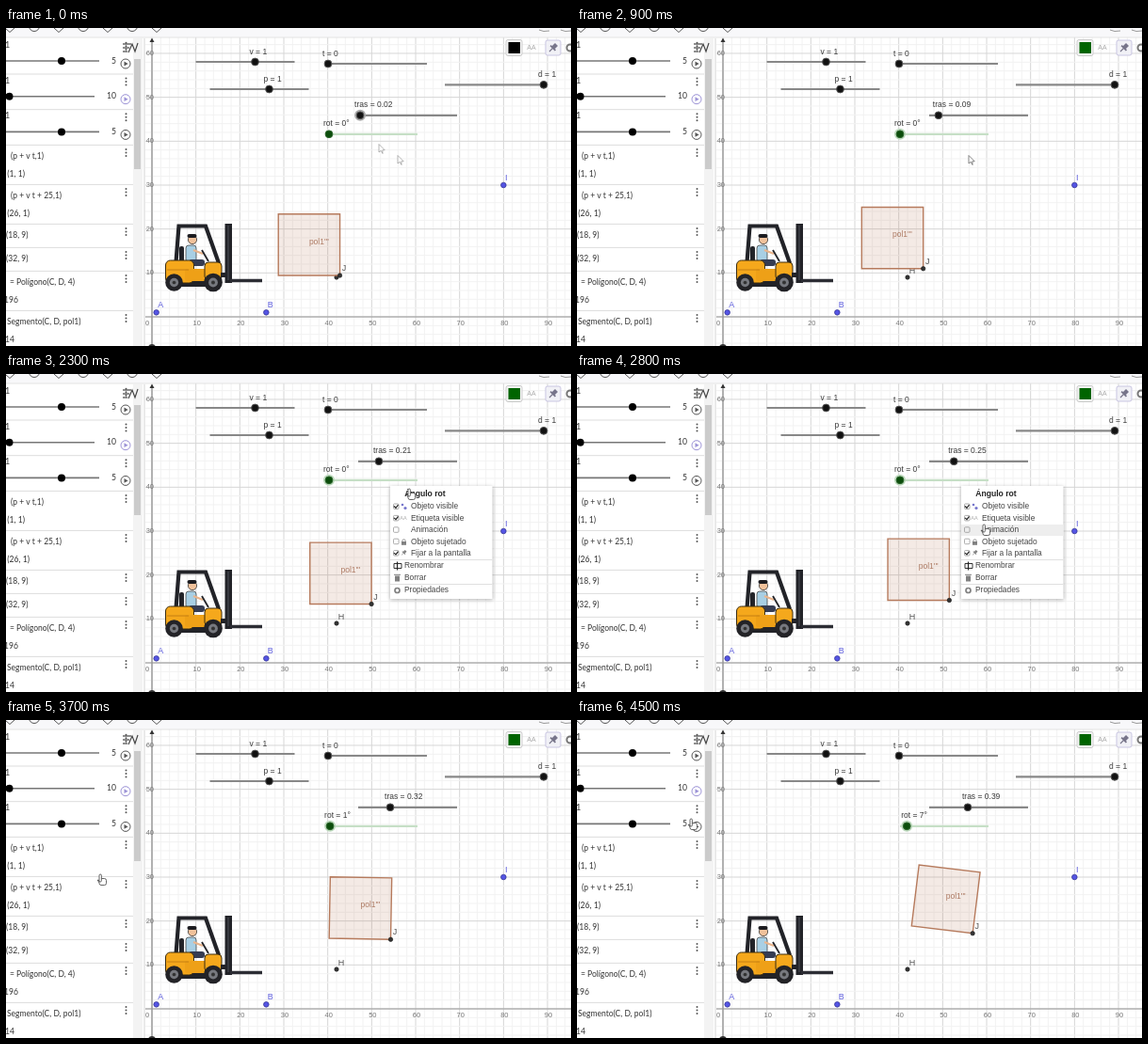
Recreate the animation shown at these times as an HTML page with a canvas. Size 600 px wide and 338 px high, loop 4600 ms.

```html
<!DOCTYPE html>
<html lang="es">
<head>
<meta charset="utf-8">
<style>
html, body { margin: 0; width: 100%; height: 100%; overflow: hidden; background: #fff; }
canvas { display: block; width: 100vw; height: 100vh; }
</style>
</head>
<body>
<canvas id="stage" width="600" height="338"></canvas>
<script>
const c = document.getElementById('stage').getContext('2d');
const LOOP = 4600, STEP = 100;
const UNIT = 4.667, OX = 155, OY = 307;
const SANS = '"Liberation Sans", Arial, sans-serif';
const MATH = 'Lato, sans-serif';
const px = x => OX + x * UNIT;
const py = y => OY - y * UNIT;

function paint(fill, stroke, width = 1) {
  if (fill) { c.fillStyle = fill; c.fill(); }
  if (stroke) { c.strokeStyle = stroke; c.lineWidth = width; c.stroke(); }
}
function box(x, y, w, h, fill, stroke, r = 0, width = 1) {
  c.beginPath();
  c.roundRect(x, y, w, h, r);
  paint(fill, stroke, width);
}
function path(pts, fill, stroke, width) {
  c.beginPath();
  pts.forEach(([x, y]) => c.lineTo(x, y));
  if (fill) c.closePath();
  paint(fill, stroke, width);
}
function line(x1, y1, x2, y2, color, width = 1) {
  path([[x1, y1], [x2, y2]], null, color, width);
}
function disc(x, y, r, fill, stroke, width) {
  c.beginPath();
  c.arc(x, y, r, 0, Math.PI * 2);
  paint(fill, stroke, width);
}
function text(s, x, y, size, color, align = 'left', font = SANS, weight = '') {
  c.font = `${weight} ${size}px ${font}`;
  c.textAlign = align;
  c.textBaseline = 'middle';
  c.fillStyle = color;
  c.fillText(s, x, y);
}

function drawGrid() {
  const shade = i => i % 5 ? '#f2f2f2' : '#d6d6d6';
  for (let i = 0; i < 48; i++) line(px(i * 2), 10, px(i * 2), 338, shade(i));
  for (let i = -3; i < 32; i++) line(148, py(i * 2), 600, py(i * 2), shade(i));
  line(OX, 12, OX, 338, '#777');
  line(148, OY, 600, OY, '#999');
  path([[OX - 2.5, 15], [OX, 10.5], [OX + 2.5, 15]], '#333');
  for (let n = 0; n <= 90; n += 10) {
    text(n, n ? px(n) + 1 : 150, 313.5, 7.5, '#777', 'center');
    if (n && n <= 60) text(n, 157, py(n), 7.5, '#777', 'right');
  }
  disc(OX, 340, 4, '#333');
}

function drawToolbar(green) {
  box(0, 0, 600, 10, '#f8f8fa');
  line(0, 10, 600, 10, '#e2e2e2');
  for (let i = 0; i < 7; i++) {
    const x = 4 + i * 26;
    if (i % 2) disc(x, -2, 5.5, null, '#555');
    else path([[x - 5, 0], [x, 4.5], [x + 5, 0]], null, '#555');
  }
  for (const x of [571, 594]) path([[x - 5, 2], [x, 3.5], [x + 6, 3]], null, '#999');

  box(531, 12.5, 17, 17, '#f4f4f4', '#ccc', 2);
  box(533.5, 15, 12.5, 12, green ? '#006400' : '#000');
  text('AA', 558, 21, 7, '#aaa', 'center');
  box(573, 13, 16, 16, '#f1f1f6', '#c9c6e2', 2);
  drawPin(581, 21, 1.25, '#77758a');
  disc(599, 21, 3.5, null, '#777', 2);
}

function drawPin(x, y, k, color) {
  c.save();
  c.translate(x, y);
  c.rotate(Math.PI / 4);
  c.scale(k, k);
  box(-1.7, -4, 3.4, 4, color);
  box(-3, -0.5, 6, 1.4, color);
  line(0, 0, 0, 4.5, color, 0.9);
  c.restore();
}

const ROWS = [
  { h: 37.7, max: '5', end: 99, knob: 59 },
  { h: 37.7, max: '10', end: 94, knob: 3.5 },
  { h: 37.7, max: '5', end: 99, knob: 59 },
  { h: 42, s: '(p + v t,1)', x: 5, value: '(1, 1)', right: 20 },
  { h: 42, s: '(p + v t + 25,1)', x: 5, value: '(26, 1)', right: 25 },
  { h: 25, s: '(18, 9)', x: 0 },
  { h: 25, s: '(32, 9)', x: 0 },
  { h: 42, s: '= Polígono(C, D, 4)', x: 4, value: '196', right: 13 },
  { h: 42, s: 'Segmento(C, D, pol1)', x: 1, value: '14', right: 9 }
];

function drawRow(row, y) {
  for (let k = -1; k < 2; k++) disc(127.5, y + 8 + k * 3.5, 1, '#555');
  line(0, y + row.h, 135, y + row.h, '#ddd');
  if (!row.max) {
    text(row.s, row.x, y + 12, 8.5, '#333', 'left', MATH);
    if (row.value) text(row.value, row.right, y + 31, 8.6, '#333', 'right', MATH);
    return;
  }
  const mid = y + 23.7, ink = row.max === '10' ? '#9b92d6' : '#555';
  text('1', -1, y + 7, 9, '#333', 'left', MATH);
  line(0, mid, row.end, mid, '#777', 1.6);
  disc(row.knob, mid, 4, '#000');
  text(row.max, 117, mid, 8.6, '#333', 'right', MATH);
  disc(127, mid + 3, 5, '#fff', ink);
  path([[125.5, mid + 0.6], [129.6, mid + 3], [125.5, mid + 5.4]], ink);
}

function drawPanel() {
  box(0, 11, 148, 327, '#fff');
  box(135, 11, 10, 327, '#f3f3f3');
  box(136, 33, 7, 117, '#cbcbcb');
  line(147, 11, 147, 338, '#d4d4d4');
  let y = 11.3;
  for (const row of ROWS) {
    drawRow(row, y);
    y += row.h;
  }
  for (let i = 0; i < 3; i++) line(124, 17 + i * 4, 133 - i * 2, 17 + i * 4, '#444', 1.2);
  path([[130, 26], [134, 17], [137, 25], [140, 16]], null, '#444', 1.2);
}

function wheel(x, y, r) {
  disc(x, y, r, '#232327');
  disc(x, y, r * 0.5, '#77797f');
  disc(x, y, r * 0.2, '#333');
}

function drawForklift() {
  const dark = '#222328', skin = '#e9b48c';
  // driver
  box(191, 231, 11, 18, '#a8cfe4', '#333', 3, 0.7);
  box(194, 246, 17, 7, '#353c52', null, 3);
  line(199, 236, 209, 240, skin, 2.2);
  disc(198, 225, 4.6, '#f1c29b', '#222', 0.7);
  box(192.5, 219, 10, 4, '#1c1c20', null, 2);
  line(208, 236, 215, 248, dark, 1.8);
  // seat and cage
  box(184, 232, 5, 17, dark, null, 2);
  path([[180.5, 249], [183.5, 210.5], [212, 210.5], [226, 250]], null, dark, 4.2);
  // body
  box(172, 262, 56, 13, dark);
  box(169.5, 247, 30, 24, '#f5a81c', '#3a2c10', 5);
  box(190, 256, 24, 13, '#eea017', null, 2);
  box(211, 249, 18, 19, '#f5a81c', '#3a2c10', 4);
  line(171, 257, 194, 257, '#c47e12');
  // mast and fork
  box(232.5, 208, 7.5, 63, dark);
  line(236, 210, 236, 268, '#54565f', 0.9);
  box(228, 260, 7, 5, dark);
  box(238, 266.7, 34, 3.6, '#2c2d34');
  wheel(178.5, 270.5, 9.3);
  wheel(220, 270.5, 9.8);
}

function point(x, y, label, dx, dy, blue) {
  disc(x, y, blue ? 2.8 : 2.2, blue ? '#5555e4' : '#333', blue ? '#30308c' : '#222', 0.7);
  text(label, x + dx, y + dy, 9, blue ? '#6060dd' : '#555', 'center');
}

function drawSquare(tras, rot) {
  const x = px(42 + 38 * tras), y = py(9 + 21 * tras), s = 14 * UNIT;
  const a = rot * Math.PI / 180, cos = Math.cos(a), sin = Math.sin(a);
  const at = (u, v) => [x + u * cos - v * sin, y + u * sin + v * cos];
  path([at(0, 0), at(0, -s), at(-s, -s), at(-s, 0)], 'rgba(165,80,40,.12)', '#b67a5c', 1.4);
  const [mx, my] = at(-s / 2, -s / 2);
  text("pol1'''", mx, my - 3, 8.5, '#ad7a63');
  point(x, y, 'J', 4.5, -7.3);
}

// all sliders share one rule; pos runs from 0 to 1
function slider(x, y, pos, label, o = {}) {
  const len = o.len || 105, knob = x + len * pos;
  line(x, y, x + len, y, o.track || '#888', 2.2);
  if (o.halo) disc(knob, y, 6, o.halo);
  disc(knob, y, 3.9, o.fill || '#111', o.ring || '#555', 1);
  text(label, knob - 6, y - 10.7, 8.5, '#3a3a3a');
}

function drawMenu(hover) {
  const x = 408, gray = '#808080', ink = '#444';
  c.save();
  c.shadowColor = 'rgba(0,0,0,.3)';
  c.shadowBlur = 4;
  c.shadowOffsetY = 1;
  box(x, 119, 108.5, 120, '#fff');
  c.restore();
  if (hover) box(x, 160, 108.5, 12, '#eee');
  text('Ángulo rot', 445, 128, 8.6, '#222', 'center', SANS, 'bold');
  const checks = ['Objeto visible', 'Etiqueta visible', 'Animación', 'Objeto sujetado', 'Fijar a la pantalla'];
  checks.forEach((s, i) => {
    const y = 141 + i * 12.4;
    box(x + 3.5, y - 3, 5.5, 5.5, null, '#999', 1, 0.8);
    if (i < 2 || i > 3) path([[x + 4, y - 0.5], [x + 6, y + 1.3], [x + 8.5, y - 2]], null, '#222', 1.2);
    text(s, 430, y, 8.4, ink);
  });
  disc(421, 139, 1.3, '#7777cc');
  disc(424, 142.5, 1.6, '#7777cc');
  text('AA', 422, 153.5, 5.5, '#aaa', 'center');
  box(420, 178, 5, 3.8, gray);
  disc(422.5, 177.5, 1.7, null, gray, 0.8);
  drawPin(422.5, 190, 0.75, gray);
  ['Renombrar', 'Borrar', 'Propiedades'].forEach((s, i) => text(s, 423, 204 + i * 13, 8.4, ink));
  for (const y of [197.5, 223.5]) line(x, y, x + 108.5, y, '#e0e0e0');
  box(412, 201.5, 8, 5, null, '#333');
  line(415.5, 199.5, 415.5, 208.5, '#222', 1.2);
  box(413, 214.5, 5, 6, gray);
  line(412, 213.3, 419, 213.3, gray);
  disc(415.5, 230, 2.5, null, gray, 1.7);
}

function arrow(x, y) {
  path([[x, y], [x, y + 8.5], [x + 2.2, y + 6.8], [x + 4, y + 10], [x + 3.8, y + 6.3], [x + 6.2, y + 6.2]],
    '#fff', '#777', 0.9);
}
function hand(x, y) {
  path([[x - 3, y + 6], [x, y + 10], [x + 1, y + 8]], '#fff', '#555', 0.9);
  box(x - 1, y + 4.5, 7.5, 7, '#fff', '#555', 2, 0.9);
  box(x - 1, y, 2.4, 8, '#fff', '#555', 1.2, 0.9);
}

// time, x, y of the pointer tip
const STOPS = [[0, 416, 135.5], [1300, 416, 135.5], [1600, 414, 112], [2300, 428, 122],
  [2800, 432, 160], [3300, 432, 160], [3700, 100, 164], [4500, 121, 105]];
function pointerAt(t) {
  const i = Math.max(1, STOPS.findIndex(k => k[0] >= t));
  const [t0, x0, y0] = STOPS[i - 1], [t1, x1, y1] = STOPS[i];
  const u = (t - t0) / (t1 - t0), e = u * u * (3 - 2 * u);
  return [x0 + (x1 - x0) * e, y0 + (y1 - y0) * e];
}

function draw(t) {
  const tras = 0.02 + t * 0.0000822;
  const rot = Math.max(0, (t - 3560) * 0.0074);
  const picked = t >= 100;

  box(0, 0, 600, 338, '#fff');
  drawGrid();
  drawForklift();
  point(px(1), py(1), 'A', 4.5, -7.5, true);
  point(px(26), py(1), 'B', 4.5, -7.5, true);
  point(px(80), py(30), 'I', 3, -7, true);
  point(px(42), py(9), picked ? 'H' : '', 5, -6.5);
  drawSquare(tras, rot);

  slider(201.5, 36, 0.6, 'v = 1');
  slider(342, 38, 0, 't = 0');
  slider(216.5, 65, 0.6, 'p = 1');
  slider(466, 60.3, 1, 'd = 1');
  slider(374, 92.8, tras, 'tras = ' + tras.toFixed(2), { halo: picked ? '' : '#aaa' });
  slider(343, 112.8, rot / 90, 'rot = ' + Math.round(rot) + '°', {
    len: 94, track: '#c6dfc6', fill: '#0b4d0b', ring: '#2c652c', halo: picked ? '#bcd8bc' : ''
  });

  drawToolbar(picked);
  drawPanel();
  if (t >= 2100 && t < 3400) drawMenu(t >= 2700);

  const [x, y] = pointerAt(t);
  c.globalAlpha = picked ? 1 : 0.6;
  if (!picked) arrow(396, 123.5);
  (t < 1400 ? arrow : hand)(x, y);
  c.globalAlpha = 1;
}

function tick(now) {
  draw(Math.floor(now % LOOP / STEP) * STEP);
  requestAnimationFrame(tick);
}
draw(0);
requestAnimationFrame(tick);
</script>
</body>
</html>
```
